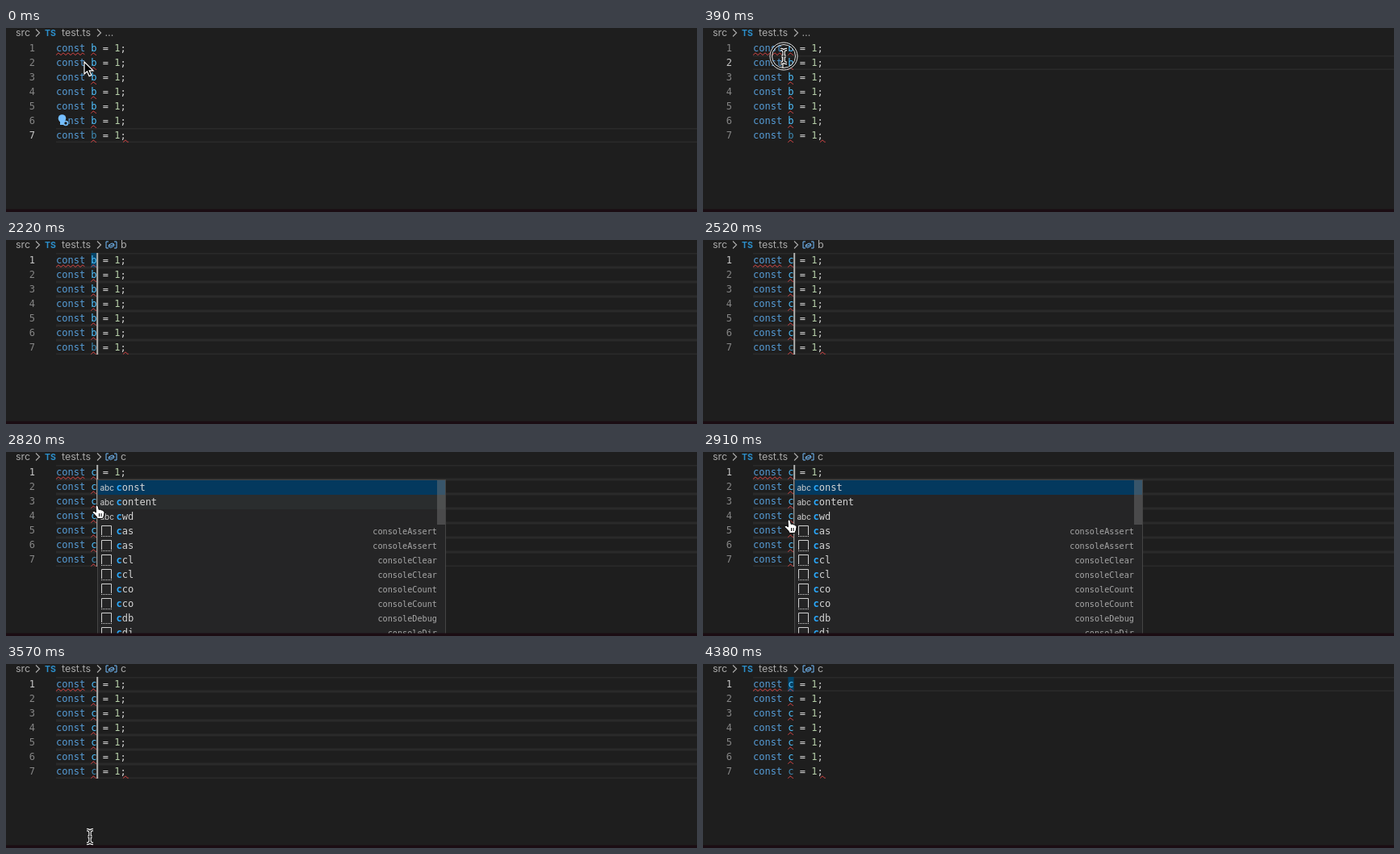
An HTML page for the animation above (4530 ms loop, 856 by 228 pixels).

```html
<!DOCTYPE html>
<html lang="en">
<head>
<meta charset="utf-8">
<title>Multi-cursor editing</title>
<style>
  html, body { margin: 0; width: 100%; height: 100%; overflow: hidden; background: #1e1e1e; }
  svg { display: block; width: 856px; height: 228px; }
  text { font: 12px "DejaVu Sans Mono", monospace; white-space: pre; fill: #d4d4d4; }
  .crumb { font: 12.5px Inter, sans-serif; fill: #a9a9a9; }
  .ts { font: bold 10.5px Inter, sans-serif; fill: #2c8fcb; }
  .abc { font: 10px Inter, sans-serif; fill: #d0d0d0; }
  .detail { font-size: 10.2px; fill: #a8a8a8; }
  .keyword { fill: #569cd6; }
  .name { fill: #4fc1ff; }
  .number { fill: #b5cea8; }
  .match { fill: #2aaaff; font-weight: bold; }
  .line { fill: none; stroke-width: 1; }
</style>
</head>
<body>
<svg id="stage" viewBox="0 0 856 228"></svg>
<script>
const LOOP = 4530, STEP = 30, LINES = 7, ROW = 18, TOP = 16, LEFT = 62, CHAR = 7.224;
const stage = document.getElementById('stage');

const within = (t, from, to) => t >= from && t < to;
const columnX = column => LEFT + column * CHAR;
const lineY = line => TOP + line * ROW;
const rect = (x, y, w, h, fill) => `<rect x="${x}" y="${y}" width="${w}" height="${h}" fill="${fill}"/>`;
const text = (x, y, body, attrs = '') => `<text x="${x}" y="${y}" ${attrs}>${body}</text>`;
const span = (cls, body, attrs = '') => `<tspan class="${cls}" ${attrs}>${body}</tspan>`;
const stroke = (d, color, attrs = '') => `<path class="line" d="${d}" stroke="${color}" ${attrs}/>`;

// Times at which a caret is added on the next line
const caretTimes = [0, 1320, 1500, 1590, 1680, 1770, 1860];

// Pointer routes: [time, x, y]; the pointer is hidden between them
const routes = [
  [[0, 97, 42], [120, 100, 28], [300, 100, 35], [450, 100, 35], [540, 119, 48], [630, 119, 48]],
  [[2820, 114, 72], [2910, 108, 90], [3180, 71, 161], [3330, 100, 195], [3570, 104, 214],
   [3840, 104, 214], [3960, 104, 218], [4170, 104, 218]],
];

const suggestions = [
  ['const'], ['content'], ['cwd'],
  ['cas', 'consoleAssert'], ['cas', 'consoleAssert'],
  ['ccl', 'consoleClear'], ['ccl', 'consoleClear'],
  ['cco', 'consoleCount'], ['cco', 'consoleCount'],
  ['cdb', 'consoleDebug'], ['cdi', 'consoleDir'],
];

function stateAt(t) {
  return {
    name: t < 2460 ? 'b' : t < 2520 ? '' : 'c',
    symbol: t < 1050 ? '' : t < 2610 ? 'b' : 'c',
    active: t < 330 ? 6 : t < 630 ? 1 : 0,
    carets: t < 3840 ? caretTimes.filter(time => t >= time).length : 1,
    column: t < 900 ? 5 : t < 2220 ? 6 : within(t, 2460, 2520) ? 6 : 7,
    caretOn: within(t, 330, 3060) || within(t, 3540, 4380),
    wordMarked: within(t, 1320, 2460) || t >= 4110,
    bulb: t < 330,
    popup: within(t, 2580, 3000),
    hover: within(t, 2820, 2910),
    ring: within(t, 300, 480),
  };
}

function pointerAt(t) {
  const route = routes.find(r => within(t, r[0][0], r[r.length - 1][0]));
  if (!route) return null;
  const i = route.findIndex(point => point[0] > t);
  const [t0, x0, y0] = route[i - 1], [t1, x1, y1] = route[i];
  const k = (t - t0) / (t1 - t0);
  return [x0 + (x1 - x0) * k, y0 + (y1 - y0) * k];
}

function squiggle(x, line, width) {
  let d = '';
  for (let i = 0; i <= width; i += 0.6) {
    d += `${i ? 'L' : 'M'}${x + i} ${lineY(line) + 16.2 + 1.2 * Math.cos(i * Math.PI / 3)}`;
  }
  return stroke(d, '#f14c4c', 'stroke-width="1.2"');
}

function breadcrumbs(symbol) {
  const chevron = x => stroke(`M${x} 1.5l4.5 4.5-4.5 4.5`, '#a9a9a9', 'style="stroke-width:1.2"');
  const tail = symbol
    ? stroke('M127 2h-3v8h3M134 2h3v8h-3M127.3 6.3l4-2.3 2.5 1.2v2l-4 2.3-2.5-1.2zl2.5 1.2 4-2.3', '#75beff')
      + text(142, 10, symbol, 'class="crumb"')
    : text(122.5, 10, '…', 'class="crumb"');
  return text(12, 10, 'src', 'class="crumb"') + chevron(37) + text(48, 9.5, 'TS', 'class="ts"')
    + text(69, 10, 'test.ts', 'class="crumb"') + chevron(113) + tail;
}

function codeLine(line, s) {
  const y = lineY(line), isActive = line >= s.active && line < s.active + s.carets;
  const last = line === LINES - 1;
  let out = '';
  if (isActive) out += rect(LEFT, y, 794, 1.5, '#2a2a2a') + rect(LEFT, y + 16.5, 794, 1.5, '#2a2a2a');
  if (line === 0 && s.wordMarked) out += rect(columnX(6), y, CHAR, ROW, 'rgba(0,73,114,.85)');
  out += text(36, y + 13, line + 1, `text-anchor="end" style="fill:${line === s.active ? '#c6c6c6' : '#858585'}"`);
  out += text(LEFT, y + 13, span('keyword', 'const') + ' '
    + span('name', s.name, last ? 'fill-opacity=".67"' : '') + ' = ' + span('number', 1) + ';');
  if (line === 0) out += squiggle(LEFT, line, 36);
  out += squiggle(columnX(6), line, 7);
  if (last) out += squiggle(145, line, 7);
  if (isActive && s.caretOn) out += rect(columnX(s.column) - 0.4, y, 2, ROW, '#aeafad');
  return out;
}

function bulb() {
  return rect(63, 107, 13.5, 15, '#1e1e1e')
    + '<circle cx="69.5" cy="112" r="4.8" fill="#75beff"/>' + rect(67, 115, 5, 5, '#75beff')
    + '<circle cx="74" cy="118" r="2.5" fill="#1e1e1e" stroke="#75beff" stroke-width="1.6"/>';
}

function popup(hover) {
  let out = rect(113.5, 34.5, 431, 200, '#252526" stroke="#454545');
  suggestions.forEach(([label, detail], i) => {
    const y = 35 + i * ROW;
    if (i === 0) out += rect(114, y, 430, ROW, '#04395e');
    if (i === 1 && hover) out += rect(114, y, 430, ROW, '#2a2d2e');
    out += detail
      ? stroke(`M118.5 ${y + 14}v-11.5h12v11.5`, '#d0d0d0')
        + stroke(`M118 ${y + 15.5}h13`, '#d0d0d0', 'stroke-dasharray="1 1"')
        + text(534, y + 12.5, detail, 'class="detail" text-anchor="end"')
      : text(116.5, y + 12.5, 'abc', 'class="abc"');
    out += text(136.5, y + 13, span('match', label[0]) + label.slice(1));
  });
  return out + rect(534, 35, 10, 55, 'rgba(121,121,121,.45)');
}

function pointer(t, s) {
  const at = pointerAt(t);
  if (!at) return '';
  let shape;
  if (t < 60) {
    shape = '<path d="M0 0v15l3.5-3.2 2.6 5.8 2.7-1.2-2.6-5.6h4.8z" fill="#000" stroke="#fff" stroke-width="1.2"/>';
  } else if (s.popup && t < 2940) {
    shape = '<path d="M-3-5q1.6-2 3 0l1.2 4.5q2-1.2 2.6.5 2-.8 2.4 1 2-.2 1.8 2l-.7 4-1.5 3.5h-6.5l-2-3.5-4.3-4.2q0-2.2 2.4-1.4l2 1.4z" fill="#fff" stroke="#000"/>'
      + stroke('M1.5 4v4M4 4v4', '#000');
  } else {
    const beam = 'M-4-8.5q4 0 4 3v11q0 3-4 3M4-8.5q-4 0-4 3M0 5.5q0 3 4 3M-2.5 0h5';
    shape = stroke(beam, '#fff', 'style="stroke-width:3.4"') + stroke(beam, '#000', 'style="stroke-width:1.2"');
  }
  if (s.ring) {
    shape = '<circle r="15.7" fill="none" stroke="#111" stroke-width="2"/>'
      + [17, 14.5].map(r => `<circle r="${r}" fill="none" stroke="#e4e4e4"/>`).join('') + shape;
  }
  return `<g transform="translate(${at})">${shape}</g>`;
}

function draw(now) {
  const t = Math.floor(now % LOOP / STEP) * STEP, s = stateAt(t);
  let out = breadcrumbs(s.symbol);
  for (let line = 0; line < LINES; line++) out += codeLine(line, s);
  if (s.bulb) out += bulb();
  if (s.popup) out += popup(s.hover);
  stage.innerHTML = out + rect(0, 224.5, 856, 3.5, '#1b0d13') + pointer(t, s);
}

const start = performance.now();
function tick() {
  draw(performance.now() - start);
  requestAnimationFrame(tick);
}
tick();
</script>
</body>
</html>
```
